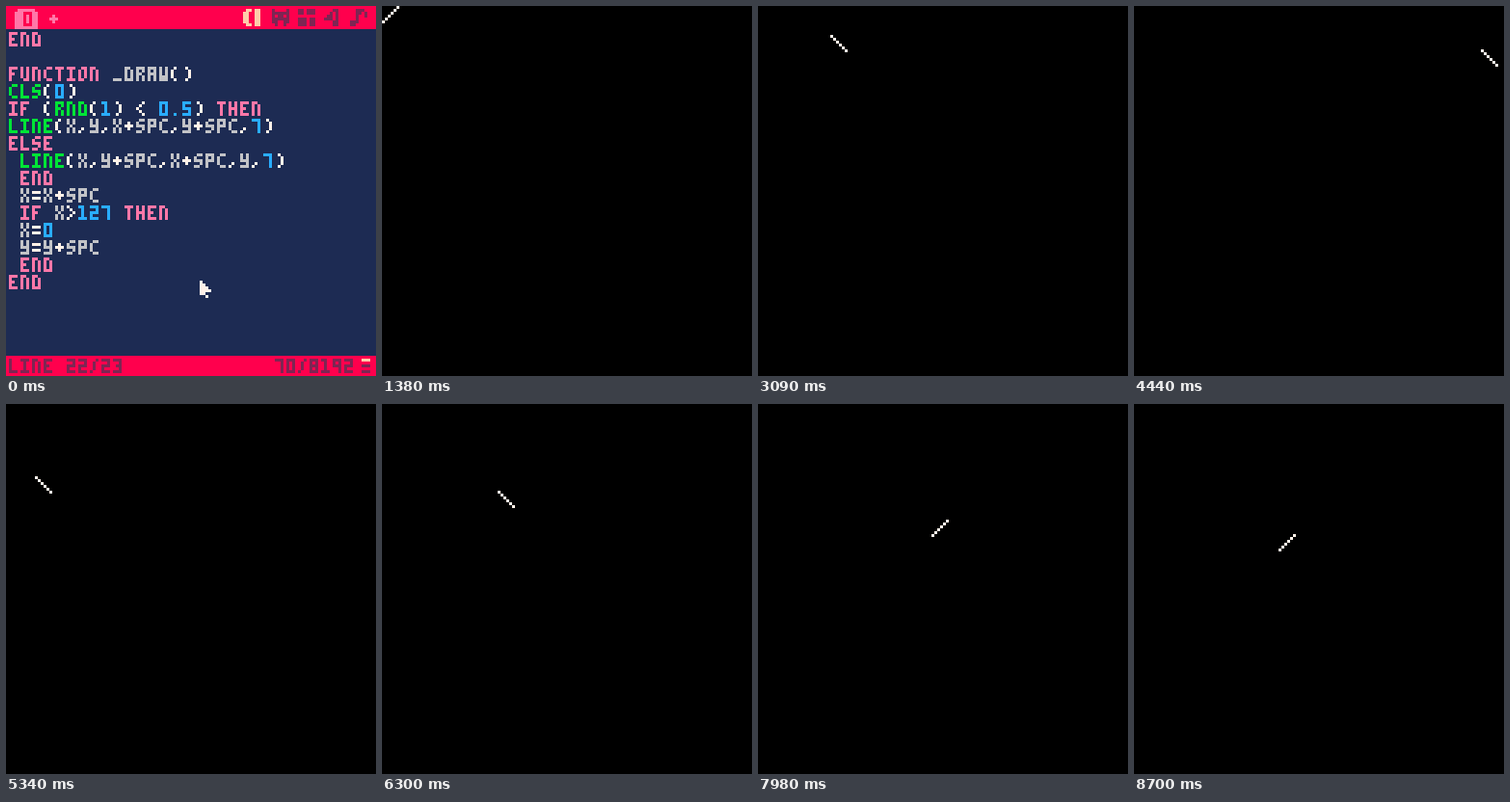
Write an HTML page with a canvas that moves like this. It is 384x384 px and loops after 8730 ms.

```html
<!DOCTYPE html>
<html lang="en">
<head>
<meta charset="utf-8">
<title>Diagonal maze</title>
<style>
html, body { margin: 0; width: 100%; height: 100%; overflow: hidden; background: #000; }
canvas { display: block; width: 100vw; height: 100vh; image-rendering: pixelated; }
</style>
</head>
<body>
<canvas id="screen" width="128" height="128"><pre id="code">END

FUNCTION _DRAW()
CLS(0)
IF (RND(1) &lt; 0.5) THEN
LINE(X,Y,X+SPC,Y+SPC,7)
ELSE
 LINE(X,Y+SPC,X+SPC,Y,7)
 END
 X=X+SPC
 IF X&gt;127 THEN
 X=0
 Y=Y+SPC
 END
END</pre></canvas>
<script>
const LOOP = 8730, RUN = 1350, STEP = 30;
const BLINKS = [210, 450, 660, 900, 1140];
const SPC = 5, COLS = 26;

const NAVY = '#1D2B53', PLUM = '#7E2553', RED = '#FF004D', PINK = '#FF77A8', PEACH = '#FFCCAA',
  WHITE = '#FFF1E8', GREY = '#C2C3C7', GREEN = '#00E436', BLUE = '#29ADFF';

// Pen strokes on a 3 by 5 grid, each point written as xy
const STROKES = {
  A: '04002024 0222', C: '201001031424', D: '1000042421', E: '20000424 0212',
  F: '200004 0212', H: '0004 2024 0222', I: '0020 1014 0424', L: '000424',
  N: '0400102124', O: '20100104142320', P: '0400202202', R: '040020211223 2324 0212',
  S: '2010010222231404', T: '0020 1014', U: '0003142420', W: '00042420 0323',
  X: '00012324 20210304', Y: '000222 202404',
  0: '0020240400', 1: '001014 0424', 2: '002022020424', 3: '00202404 1222',
  5: '200002222404', 7: '002024', 8: '0020240400 0222', 9: '2420000222',
  '(': '10010314', ')': '10212314', _: '0424', ',': '1304', '.': '14',
  '+': '1113 0222', '=': '0121 0323', '<': '200224', '>': '002204', '/': '20111304'
};

const TOKEN = /(FUNCTION|IF|THEN|ELSE|END)\b|(CLS|RND|LINE)\b|([\d.]+)|([A-Z_]+)|./g;
const TOKEN_COLORS = [PINK, GREEN, BLUE, GREY];

const ctx = document.getElementById('screen').getContext('2d');
const code = document.getElementById('code').textContent.split('\n');

function rect(color, x, y, w, h) {
  ctx.fillStyle = color;
  ctx.fillRect(x, y, w, h);
}

function line(color, x0, y0, x1, y1) {
  const n = Math.max(Math.abs(x1 - x0), Math.abs(y1 - y0));
  for (let i = 0; i <= n; i++) {
    const k = n && i / n;
    rect(color, Math.round(x0 + (x1 - x0) * k), Math.round(y0 + (y1 - y0) * k), 1, 1);
  }
}

function strokes(color, paths, x, y) {
  for (const path of paths.split(' ')) {
    const points = path.match(/../g).map(([px, py]) => [x + +px, y + +py]);
    points.forEach((p, i) => line(color, ...points[Math.max(i - 1, 0)], ...p));
  }
}

function print(color, text, x, y) {
  [...text].forEach((ch, i) => {
    if (STROKES[ch]) strokes(color, STROKES[ch], x + i * 4, y);
  });
}

function drawCode() {
  code.forEach((row, i) => {
    for (const m of row.matchAll(TOKEN)) {
      const kind = m.slice(1).findIndex(Boolean);
      print(TOKEN_COLORS[kind] || WHITE, m[0], 1 + m.index * 4, 9 + i * 6);
    }
  });
}

function drawBars() {
  rect(RED, 0, 0, 128, 8);
  rect(PINK, 4, 1, 6, 1);
  rect(PINK, 3, 2, 8, 6);
  print(RED, '0', 6, 2);
  print(PINK, '+', 15, 2);

  strokes(PEACH, '2010 1114 0104 1525', 82, 1);
  strokes(PEACH, '0010 0104 1114 0515', 86, 1);
  strokes(PLUM, '0004 5054 0151 2123 3133 0353 1415 4445', 92, 1);
  rect(PLUM, 101, 1, 2, 2);
  rect(PLUM, 104, 1, 3, 2);
  rect(PLUM, 101, 4, 3, 3);
  rect(PLUM, 105, 4, 2, 3);
  strokes(PLUM, '4030120313223545 4045', 110, 1);
  strokes(PLUM, '2024 30405152 2131 0414 0515', 119, 1);

  rect(RED, 0, 121, 128, 7);
  print(PLUM, 'LINE 22/23', 1, 122);
  print(PLUM, '70/8192', 93, 122);
  [PEACH, PLUM, PLUM].forEach((color, i) => rect(color, 123, 122 + i * 2, 3, 1));
}

function drawEditor(t) {
  rect(NAVY, 0, 0, 128, 128);
  drawCode();
  if (BLINKS.filter(b => t >= b).length % 2) rect(RED, 16, 86, 5, 6);
  drawBars();
  [1, 2, 3, 4, 2].forEach((w, i) => rect(WHITE, 67, 95 + i, w, 1));
  rect(WHITE, 69, 100, 1, 1);
}

function drawMaze(n) {
  rect('#000', 0, 0, 128, 128);
  if (n < 0) return;
  const x = n % COLS * SPC, y = Math.floor(n / COLS) * SPC;
  const rising = 3 * n * (n + 1) % 31 < 16; // repeatable coin toss
  line(WHITE, x, rising ? y + SPC : y, x + SPC, rising ? y : y + SPC);
}

function frame() {
  const t = performance.now() % LOOP;
  if (t < RUN) drawEditor(t);
  else drawMaze(Math.floor((t - RUN) / STEP) - 1);
  requestAnimationFrame(frame);
}
frame();
</script>
</body>
</html>
```
